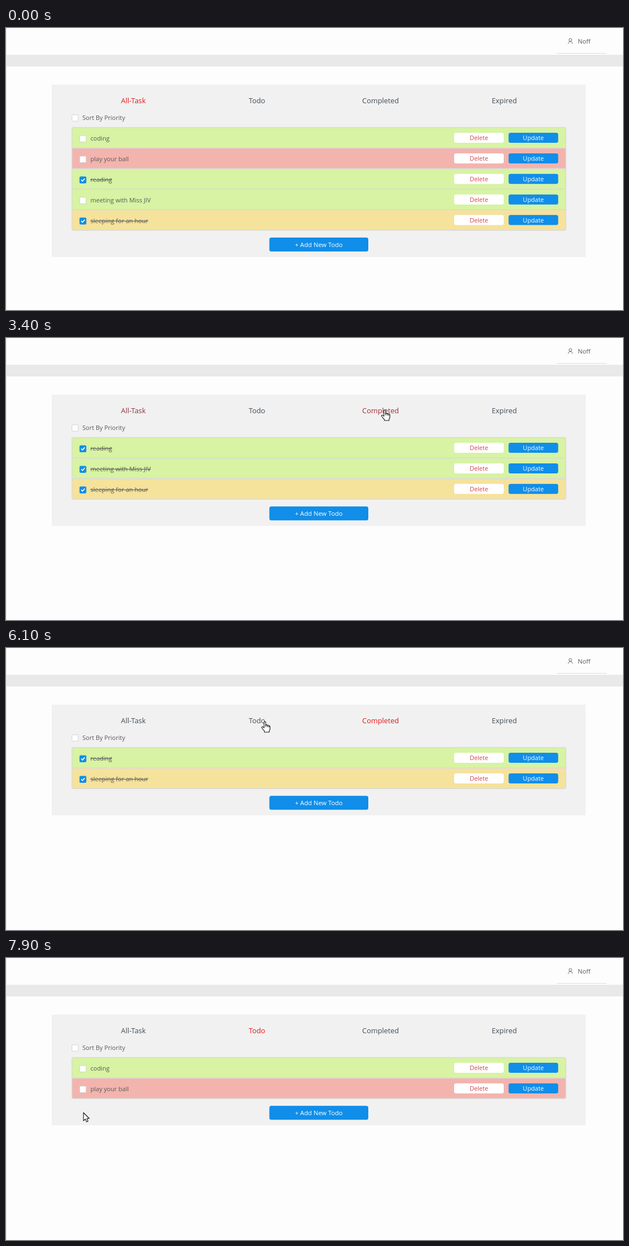
An HTML page with a canvas for the animation above (8000 ms loop, 1107x506 px).

```html
<!DOCTYPE html>
<html lang="en">
<head>
<meta charset="utf-8">
<title>Todo list</title>
<style>
html, body { margin: 0; width: 100%; height: 100%; overflow: hidden; background: #fdfdfd; }
canvas { display: block; }
</style>
</head>
<body>
<canvas id="stage" width="1107" height="506"></canvas>
<script>
const ctx = document.getElementById('stage').getContext('2d');
const LOOP = 8000, STEP = 100;
const ROW_TOP = 178.5, ROW_H = 36.9;
const BLUE = '#108ee9', LINE = '#d9d9d9', INK = '#595959';
const GREEN = '#d7f3a3', PINK = '#f3b4ae', AMBER = '#f5e29b';
const GRAY_RGB = [64, 77, 89], RED_RGB = [228, 24, 26];

const tabs = [['All-Task', 228.5], ['Todo', 450.3], ['Completed', 672], ['Expired', 894]];
const tabClicks = [{ at: 3300, from: 0, to: 2 }, { at: 6325, from: 2, to: 1 }];

const tasks = [
  { name: 'coding', color: GREEN, done: () => false },
  { name: 'play your ball', color: PINK, done: () => false },
  { name: 'reading', color: GREEN, done: () => true },
  { name: 'meeting with Miss JIV', color: GREEN, done: t => (t >= 1900 && t < 5200) || t >= 7800 },
  { name: 'sleeping for an hour', color: AMBER, done: () => true }
];

// time, x, y of the pointer tip
const path = [
  [100, 577, 490], [500, 310, 372], [800, 142, 303], [900, 131, 302], [1000, 130, 309],
  [1400, 136, 305], [1700, 143, 308], [1900, 143, 308], [2500, 469, 195], [2700, 496, 130],
  [3200, 680, 129], [3400, 680, 129], [4200, 124, 272], [4800, 143, 235.5], [5300, 143, 235.5],
  [6100, 465, 132], [6400, 465, 132], [7200, 150, 162], [7300, 125, 170], [7400, 114, 192],
  [7600, 139, 277.5], [7900, 139, 277.5]
];
const handSpans = [[1400, 1900], [3000, 3400], [5000, 5300], [6000, 6400], [7700, 7800]];

const arrow = new Path2D('M0 0V14.6L3.4 11.5L5.6 16.6L8.2 15.5L6 10.5H10.4Z');
const hand = new Path2D('M-2 1.4Q-2 0-.5 0Q1 0 1 1.4V6.2Q3.4 5.2 4 7Q6 6 6.7 7.8Q8.7 7.2 8.7 9.4V13' +
  'Q8.7 15 7.2 16.7V19H-1.2V17.2Q-3.4 15-6 11.2Q-6.6 9.6-5 9.3Q-3.6 9.4-2 11.4Z');
const knuckles = new Path2D('M1 6V9.5M4 7V10M6.7 7.8V10.5');

function text(str, x, y, color = INK, size = 11, align = 'left') {
  ctx.font = `${size}px "Open Sans", "Noto Sans", sans-serif`;
  ctx.textAlign = align;
  ctx.fillStyle = color;
  ctx.fillText(str, x, y);
}

function rect(x, y, w, h, color) {
  ctx.fillStyle = color;
  ctx.fillRect(x, y, w, h);
}

function rounded(x, y, w, h, r, fill, stroke, width = 1) {
  ctx.beginPath();
  ctx.roundRect(x, y, w, h, r);
  if (fill) { ctx.fillStyle = fill; ctx.fill(); }
  if (stroke) { ctx.strokeStyle = stroke; ctx.lineWidth = width; ctx.stroke(); }
}

function button(label, x, y, w, h, fill, color, size) {
  rounded(x, y, w, h, 3.5, fill);
  text(label, x + w / 2, y + h / 2 + 4, color, size, 'center');
}

function checkbox(cx, cy, checked) {
  rounded(cx - 5.7, cy - 5.7, 11.4, 11.4, 1.5, checked ? BLUE : '#fff', checked ? BLUE : '#d2d2d2');
  if (!checked) return;
  ctx.beginPath();
  ctx.moveTo(cx - 3, cy - 0.2);
  ctx.lineTo(cx - 0.8, cy + 2.1);
  ctx.lineTo(cx + 3.3, cy - 2.4);
  ctx.strokeStyle = '#fff';
  ctx.lineWidth = 1.7;
  ctx.stroke();
}

function header() {
  rect(0, 48, 1107, 21, '#e9e9e9');
  rect(0, 0, 1, 506, '#ebebeb');
  rect(988, 45, 90, 1, '#dcdcdc');
  ctx.strokeStyle = INK;
  ctx.lineWidth = 0.9;
  ctx.beginPath();
  ctx.arc(1012.5, 21.4, 2.5, 0, 7);
  ctx.moveTo(1008.8, 28.3);
  ctx.bezierCurveTo(1008.9, 22.8, 1016.1, 22.8, 1016.2, 28.3);
  ctx.stroke();
  text('Noff', 1026, 27.5);
}

function tabBar(t) {
  const heat = [1, 0, 0, 0];
  for (const { at, from, to } of tabClicks) {
    const p = Math.min(1, Math.max(0, (t - at) / 300));
    if (!p) continue;
    const k = 1 - (1 - p) ** 2;
    heat[from] = 1 - k;
    heat[to] = k;
  }
  tabs.forEach(([label, x], i) => {
    const rgb = GRAY_RGB.map((g, c) => Math.round(g + (RED_RGB[c] - g) * heat[i]));
    text(label, x, 134.6, `rgb(${rgb})`, 12.9, 'center');
  });
}

function taskRow(task, i, t) {
  const y = ROW_TOP + ROW_H * i, done = task.done(t);
  rect(118.5, y, 886, ROW_H, task.color);
  if (i) rect(118.5, y - 0.8, 886, 1.6, LINE);
  checkbox(138, y + 20.3, done);
  text(task.name, 151.5, y + 23.6);
  if (done) rect(151.5, Math.round(y + 19.5), ctx.measureText(task.name).width, 1, INK);
  button('Delete', 804, y + 9.5, 89, 18, '#fff', '#d9444a');
  button('Update', 901.7, y + 9.5, 89, 18, BLUE, '#fff');
}

function list(t) {
  const shown = tasks.filter(k => t < 3400 || k.done(t) === (t < 6400));
  const h = ROW_H * shown.length, bottom = ROW_TOP + h;
  rect(82, 101.5, 958, bottom + 48 - 101.5, '#f1f1f1');
  tabBar(t);
  checkbox(124, 161.5, false);
  text('Sort By Priority', 137, 165);
  ctx.save();
  ctx.beginPath();
  ctx.roundRect(118, ROW_TOP, 887, h, 3);
  ctx.clip();
  shown.forEach((task, i) => taskRow(task, i, t));
  ctx.restore();
  rounded(118.3, ROW_TOP, 886.2, h, 3, null, LINE, 1.4);
  button('+ Add New Todo', 472.5, bottom + 13, 177.5, 25, BLUE, '#fff', 11.3);
}

function cursor(t) {
  if (t < path[0][0]) return;
  let i = path.findIndex(p => p[0] > t);
  if (i < 0) i = path.length - 1;
  const [t0, x0, y0] = path[i - 1], [t1, x1, y1] = path[i];
  const p = Math.min(1, (t - t0) / (t1 - t0)), k = p * p * (3 - 2 * p);
  const pointing = handSpans.some(([a, b]) => t >= a && t <= b);
  const shape = pointing ? hand : arrow;
  ctx.save();
  ctx.translate(x0 + (x1 - x0) * k, y0 + (y1 - y0) * k);
  ctx.lineJoin = 'round';
  ctx.lineWidth = 1.1;
  ctx.fillStyle = '#fff';
  ctx.strokeStyle = '#111';
  ctx.fill(shape);
  ctx.stroke(shape);
  if (pointing) ctx.stroke(knuckles);
  ctx.restore();
}

function draw(now) {
  const t = Math.floor((now % LOOP) / STEP) * STEP;
  rect(0, 0, 1107, 506, '#fdfdfd');
  header();
  list(t);
  cursor(t);
}

const start = performance.now();
function tick() {
  draw(performance.now() - start);
  requestAnimationFrame(tick);
}
tick();
</script>
</body>
</html>
```
